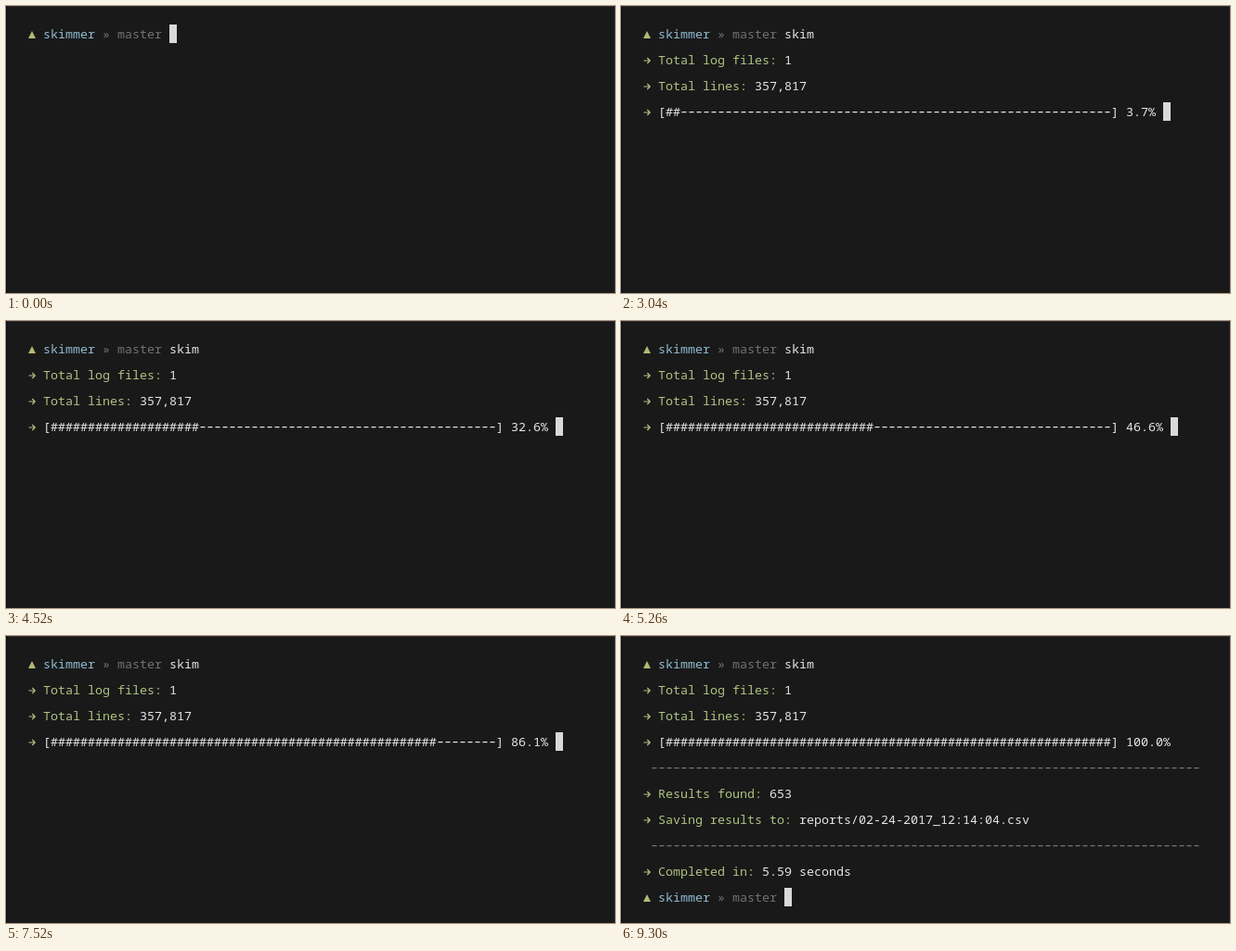
These frames come from a looping animation (656x310 px, 9340 ms). An HTML page with a canvas:

```html
<!DOCTYPE html>
<html lang="en">
<head>
<meta charset="utf-8">
<title>Terminal progress</title>
<style>
  html, body { margin: 0; width: 100%; height: 100%; overflow: hidden; background: #191919; }
  canvas { display: block; width: 656px; height: 310px; }
</style>
</head>
<body>
<canvas id="stage" width="656" height="310"></canvas>
<script>
const ctx = document.getElementById('stage').getContext('2d');

const LOOP = 9340, FPS = 23;
const CELL = 8, LEFT = 24, ROW = 28, TOP = 20;
const BAR = 60;
const COLOR = {
  bg: '#191919', green: '#b1c283', olive: '#b3b873', blue: '#92bcd2',
  gray: '#727272', rule: '#777777', white: '#e6e6e6', cursor: '#d9d9d9'
};

// Ticks at which things happen
const KEYS = [19, 22, 25, 28, 32];
const ENTER = 60, FILES = 64, LINES = 65, DONE = 191, PROMPT = 193;

// Progress updates run at 16 per second: [update, percent]
const PACE = [[45, 0], [60, 18.7], [84, 46.6], [104, 68.5], [120, 86.1], [133, 100]];

const colX = col => LEFT + col * CELL;
const rowY = row => TOP + row * ROW;

function percentAt(tick) {
  if (tick >= DONE) return 100;
  const n = Math.floor(tick * 16 / FPS + 0.2);
  const i = Math.max(1, PACE.findIndex(p => n <= p[0]));
  const [n0, p0] = PACE[i - 1], [n1, p1] = PACE[i];
  return Math.max(0, p0 + (p1 - p0) * (n - n0) / (n1 - n0));
}

function text(str, col, row, color) {
  ctx.fillStyle = color;
  ctx.fillText(str, colX(col), rowY(row) + 15);
}

function dashes(count, col, row, color) {
  ctx.fillStyle = color;
  for (let i = 0; i < count; i++) {
    ctx.fillRect(colX(col + i) + 1.5, rowY(row) + 10, 5, 1.2);
  }
}

function cursor(col, row) {
  ctx.fillStyle = COLOR.cursor;
  ctx.fillRect(colX(col), rowY(row), CELL, 20);
}

function arrow(row) {
  const y = rowY(row) + 11;
  ctx.strokeStyle = COLOR.green;
  ctx.lineWidth = 1.2;
  ctx.beginPath();
  ctx.moveTo(24.5, y);
  ctx.lineTo(31, y);
  ctx.moveTo(28.3, y - 3);
  ctx.lineTo(31.2, y);
  ctx.lineTo(28.3, y + 3);
  ctx.stroke();
}

function prompt(row) {
  const y = rowY(row);
  ctx.fillStyle = COLOR.olive;
  ctx.beginPath();
  ctx.moveTo(28, y + 7);
  ctx.lineTo(32, y + 15);
  ctx.lineTo(24, y + 15);
  ctx.fill();
  text('skimmer', 2, row, COLOR.blue);
  text('»', 10, row, COLOR.gray);
  text('master', 12, row, COLOR.gray);
}

function entry(label, value, row) {
  arrow(row);
  text(label, 2, row, COLOR.green);
  text(value, 3 + label.length, row, COLOR.white);
}

function progress(percent) {
  const filled = Math.round(percent / 100 * BAR);
  const label = percent.toFixed(1) + '%';
  arrow(3);
  text('[' + '#'.repeat(filled), 2, 3, COLOR.white);
  dashes(BAR - filled, 3 + filled, 3, COLOR.white);
  text('] ' + label, 3 + BAR, 3, COLOR.white);
  return 6 + BAR + label.length;
}

function results() {
  dashes(74, 1, 4, COLOR.rule);
  entry('Results found:', '653', 5);
  entry('Saving results to:', 'reports/02-24-2017_12:14:04.csv', 6);
  dashes(74, 1, 7, COLOR.rule);
  entry('Completed in:', '5.59 seconds', 8);
}

function frame() {
  ctx.fillStyle = COLOR.bg;
  ctx.fillRect(0, 0, 656, 310);
  ctx.fillStyle = '#2c2c2c';
  ctx.fillRect(0, 0, 656, 1);
  ctx.fillStyle = '#10101f';
  ctx.fillRect(0, 0, 1.5, 310);
  ctx.fillStyle = '#20203a';
  ctx.fillRect(655, 0, 1, 310);
}

function draw(time) {
  const tick = Math.floor((time + 5) * FPS / 1000);
  const typed = KEYS.filter(k => tick >= k).length;
  frame();
  prompt(0);
  text('skim '.slice(0, typed), 19, 0, COLOR.white);
  if (tick < ENTER) return cursor(19 + typed, 0);
  if (tick < FILES) return cursor(0, 1);
  entry('Total log files:', '1', 1);
  if (tick < LINES) return cursor(0, 2);
  entry('Total lines:', '357,817', 2);
  const end = progress(percentAt(tick));
  if (tick < DONE) return cursor(end, 3);
  results();
  if (tick < PROMPT) return cursor(0, 9);
  prompt(9);
  cursor(19, 9);
}

ctx.font = '13.3333px "Noto Sans Mono", "DejaVu Sans Mono", monospace';
ctx.textBaseline = 'alphabetic';

const start = performance.now();
function loop() {
  draw((performance.now() - start) % LOOP);
  requestAnimationFrame(loop);
}
loop();
</script>
</body>
</html>
```
